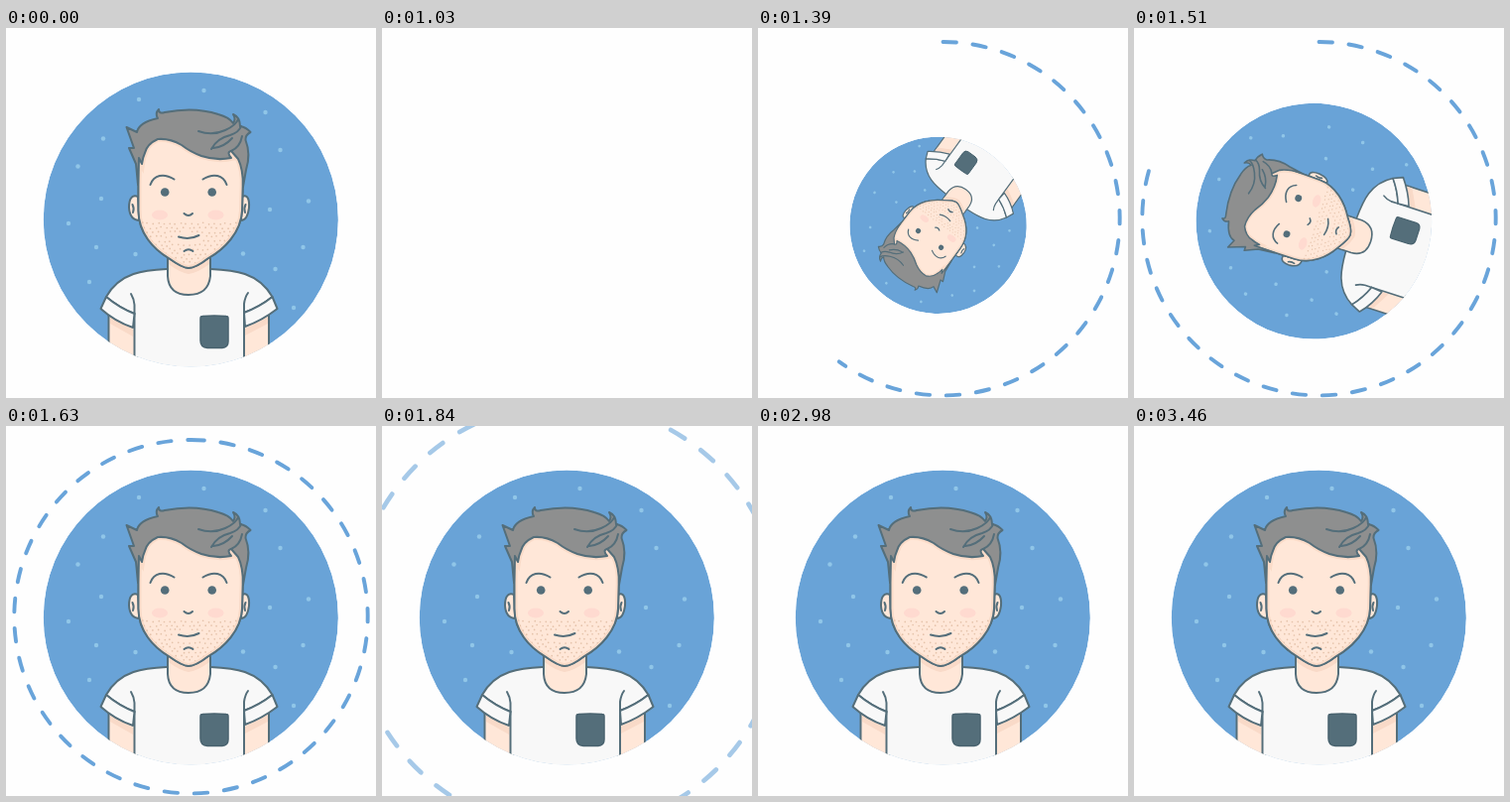
An HTML page for the animation above (4.63 s loop, 373 by 373 pixels).

```html
<!DOCTYPE html>
<html lang="en">
<head>
<meta charset="utf-8">
<title>Avatar</title>
<style>
  html, body { margin: 0; width: 100%; height: 100%; overflow: hidden; background: #fefefe; }
  svg { display: block; width: 100%; height: 100%; }
  .line { stroke: #546e7a; stroke-width: 2; stroke-linecap: round; stroke-linejoin: round; fill: none; }
  .skin { fill: #ffe7d8; }
  .shade { fill: #f9dac8; }
  .rim { fill: none; stroke: #fbdcc9; stroke-width: 6; }
  .shirt { fill: #f8f8f8; }
  .hair { fill: #8e8f8f; }
  .dark { fill: #546e7a; }
</style>
</head>
<body>
<svg viewBox="0 0 373 373">
  <defs>
    <clipPath id="disc"><circle cx="186.3" cy="193" r="148.6"/></clipPath>
    <clipPath id="jaw"><path d="M136 192C138 207 151 221 166 230Q178 238 184 239Q191 238 203 230C218 221 231 207 236 192Z"/></clipPath>
    <path id="face" d="M133.500 112V184C133.500 207 149 223 164 232Q178 242 184 242Q191 242 204 232C220 223 237 206 238 184L240 112Q185 85 133.500 112Z"/>
    <clipPath id="inFace"><use href="#face"/></clipPath>
    <path id="mop" d="M133 158L131 137L124 121L129 121L121.500 100L132 105Q134 95 153 91Q150 86 154 82Q154 87 160 85Q190 79 214 87Q225 90 229 96Q232 92 229 87Q236 90 236 99Q242 100 246.500 105Q241 108 241.500 113Q247 127 242 143L239 160Q239 142 234 132L227 124Q222 125 227 131Q212 134 197 129Q186 125 177 118Q165 111 153 112Q142 117 140 126Q138 130 137 137L134 131Z"/>
  </defs>

  <path id="ring" fill="none" stroke="#69a4da" stroke-width="3.900" stroke-linecap="round" stroke-dasharray="13.5 16.65"/>

  <g id="avatar" clip-path="url(#disc)">
    <circle cx="186.3" cy="193" r="148.6" fill="#69a3d7"/>
    <g id="specks" fill="#90c6e8"></g>

    <!-- arms -->
    <path class="line skin" d="M103.500 282V350H132V282ZM238 282V350H265V282Z"/>
    <path class="shade" d="M105 291L128 304V311L105 298ZM264 291L241 303V310L264 298Z"/>

    <!-- shirt and neck -->
    <path class="line shirt" d="M162 243C140 244 115 246 101 271Q114 282 129.500 288V350H240V287Q256 281 268.500 271C254 246 230 244 206 243Z"/>
    <path class="line" d="M129.500 288V279Q129 273 126 268M240 287V278Q241 271 244 267"/>
    <path class="line shirt" d="M101 271L95.500 283Q110 296 128 302L129.500 288Q114 282 101 271ZM268.500 271L273.500 283Q258 295 241 301L240 287Q256 281 268.500 271Z"/>
    <path class="line skin" d="M163 226V250Q164 269 184 269Q204 269 206 250V226Z"/>
    <path class="shade" d="M164 231Q176 241 184 242Q193 241 205 231V238Q193 247 184 248Q174 246 164 238Z"/>
    <path d="M198 290.500Q210 289.500 222 290.500Q224 290.500 224 293V316Q224 322 218 322.500H203Q196 322 196 315V293Q196 290.500 198 290.500Z" class="dark" stroke="#48626e" stroke-width="1.500"/>

    <!-- head -->
    <path class="line skin" d="M133 170C126 167 124 174 124 181C124.500 189 128 194 135 194ZM238 170C244 167 245.500 174 245 181C244 189 241 194 237 194Z"/>
    <path class="line" d="M127.500 178Q129.500 182 128 186M241.500 178Q239.500 182 241 186"/>
    <use href="#face" class="line skin"/>
    <g clip-path="url(#inFace)">
      <use href="#face" class="rim"/>
      <use href="#mop" class="rim"/>
    </g>
    <use href="#face" class="line"/>
    <g fill="#ffdad0"><ellipse cx="155" cy="188.5" rx="8" ry="5"/><ellipse cx="211.5" cy="188.5" rx="8" ry="5"/></g>
    <g id="stubble" fill="#e5c3ab" clip-path="url(#jaw)"></g>

    <circle class="dark" cx="160.2" cy="165.5" r="4.3"/>
    <circle class="dark" cx="207.7" cy="165.5" r="4.3"/>
    <path id="brow" class="line" d="M145.500 158C149 148 159 146 169.500 152.500"/>
    <path class="line" d="M198.500 152.500C209 146 219 148 222.500 158"/>
    <path class="line" d="M179.500 187Q184 191 188 187M174 210.500Q185 214 194.500 209M179.500 225Q184 221.500 188.500 225"/>

    <!-- hair -->
    <use href="#mop" class="line hair"/>
    <path class="line" d="M194 104Q208 109 221 103Q232 98 234 92M207 122Q213 111 226 108Q235 105 237 99M209 121Q220 120 228 111M227 124Q236 120 238 109"/>
  </g>
</svg>
<script>
const LOOP = 4630, STEP = 30, OFFSET = 10;
const HUB = { x: 184.2, y: 197.4 };
const RING = { x: 186.5, y: 192.2, r: 178.2 };
const $ = id => document.getElementById(id);
const clamp = v => Math.min(1, Math.max(0, v));
const span = (t, a, b) => clamp((t - a) / (b - a));
const ease = p => p * p * (3 - 2 * p);

function addDot(parent, cx, cy, r) {
  const dot = document.createElementNS("http://www.w3.org/2000/svg", "circle");
  Object.entries({ cx, cy, r }).forEach(([k, v]) => dot.setAttribute(k, v));
  parent.append(dot);
}

[[134, 72], [199.5, 63], [261.5, 85], [98, 111.5], [276.5, 123], [72.5, 139.5], [96, 172], [305, 174.5],
 [266, 183], [63, 197], [91, 221], [299.5, 221], [84, 256], [130.5, 228], [239, 227.5], [271.5, 243], [290, 282]]
  .forEach(([x, y]) => addDot($("specks"), x, y, 2.2));

let seed = 7;
const jitter = () => (seed = seed * 16807 % 2147483647) / 2147483647 - 0.5;

for (let row = 0; row < 10; row++) {
  for (let x = 137 + row % 2 * 2.8; x < 236; x += 5.6) {
    const y = 197 + row * 4.4 + jitter() * 2;
    const nearLips = Math.abs(x - 184.5) < 14 && y > 206 && y < 218;
    if (!nearLips) addDot($("stubble"), x + jitter() * 2, y, 0.85);
  }
}

function arc(p) {
  const a = Math.min(p, 0.9999) * 2 * Math.PI;
  const { x, y, r } = RING;
  const end = `${x + r * Math.sin(a)} ${y - r * Math.cos(a)}`;
  return `M${x} ${y - r}A${r} ${r} 0 ${p > 0.5 ? 1 : 0} 1 ${end}`;
}

function draw(time) {
  const t = Math.floor((time - OFFSET) / STEP) * STEP + OFFSET;

  // The portrait grows through one full turn while the ring is traced.
  const grow = t < 1030 ? 1 : span(t, 1030, 1630);
  $("avatar").setAttribute("visibility", grow ? "visible" : "hidden");
  $("avatar").setAttribute("transform",
    `translate(${HUB.x} ${HUB.y}) rotate(${360 * (grow - 1)}) scale(${grow}) translate(${-HUB.x} ${-HUB.y})`);

  const leave = span(t, 1690, 2050);
  const k = 1 + 0.5 * leave;
  $("ring").setAttribute("visibility", t > 1030 && t < 2050 ? "visible" : "hidden");
  $("ring").setAttribute("d", arc(grow));
  $("ring").setAttribute("opacity", 1 - leave);
  $("ring").setAttribute("transform",
    `translate(${RING.x} ${RING.y}) scale(${k}) translate(${-RING.x} ${-RING.y})`);

  const lift = ease(span(t, 2950, 3160)) - ease(span(t, 3220, 3460));
  $("brow").setAttribute("transform", `translate(${4 * lift} ${-lift})`);
}

const start = performance.now();
function tick() {
  draw((performance.now() - start) % LOOP);
  requestAnimationFrame(tick);
}
tick();
</script>
</body>
</html>
```
